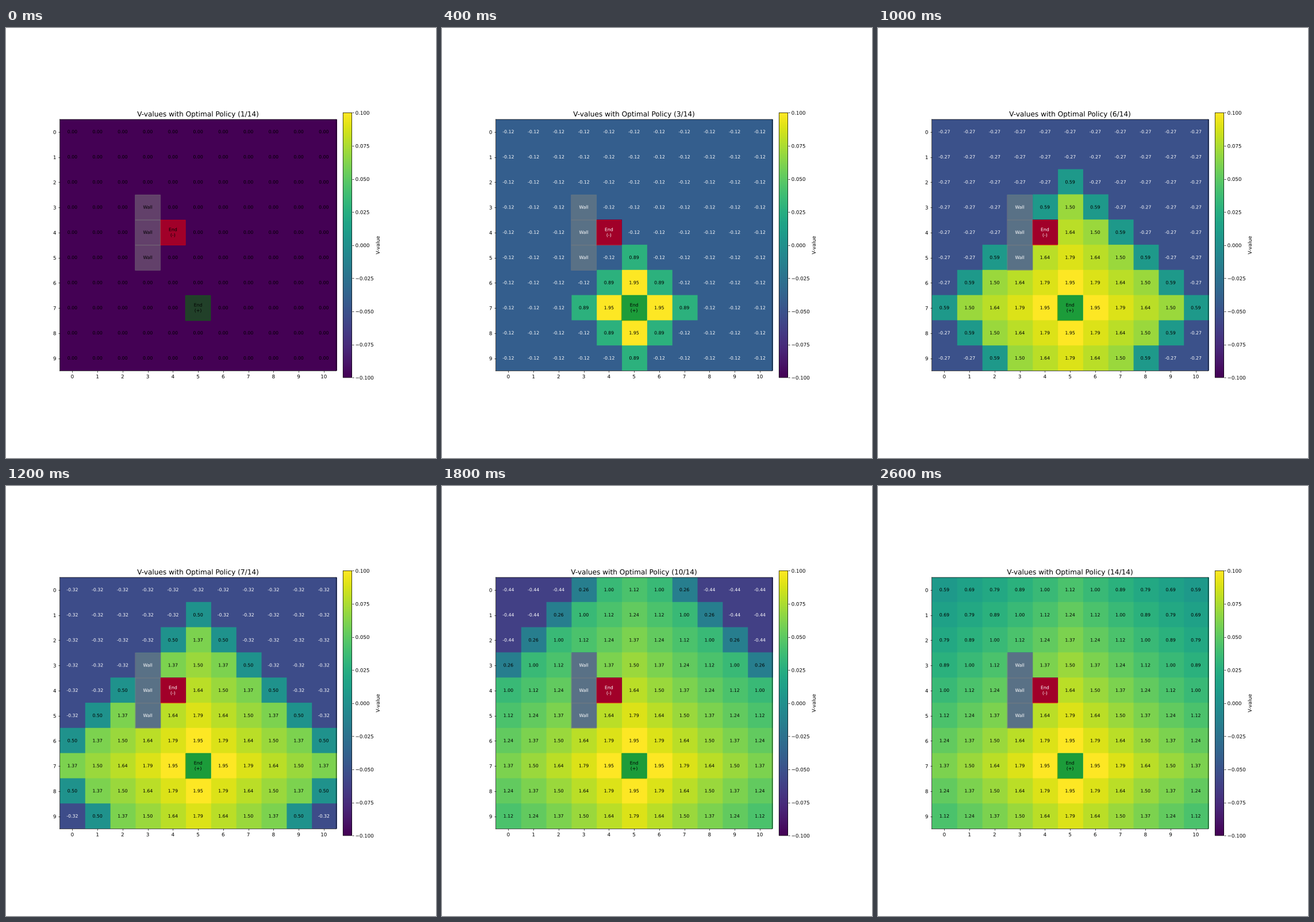
Write a matplotlib script that moves like this. It is 748 by 748 pixels and loops after 2.8 s.

```python
import numpy as np
import matplotlib.pyplot as plt
from matplotlib.animation import FuncAnimation
from matplotlib.cm import ScalarMappable
from matplotlib.colors import Normalize
from matplotlib.patches import Rectangle
from matplotlib.patheffects import Normal
from matplotlib.text import Text

ROWS, COLS, STEPS = 10, 11, 14
WALLS = [(3, 3), (4, 3), (5, 3)]
PIT, GOAL = (4, 4), (7, 5)
GAMMA, STEP_REWARD = 0.95, -0.06
FINE = 70  # samples per cell, so that cell edges come out smooth

reward = np.full((ROWS, COLS), STEP_REWARD)
reward[GOAL], reward[PIT] = 1, -1


def sweep(values):
    """One round of value iteration; moving off the grid stays in place."""
    gain = reward + GAMMA * values
    for wall in WALLS:
        gain[wall] = -np.inf
    gain = np.pad(gain, 1, mode="edge")
    best = np.max([gain[:-2, 1:-1], gain[2:, 1:-1],
                   gain[1:-1, :-2], gain[1:-1, 2:]], axis=0)
    for cell in [*WALLS, PIT, GOAL]:
        best[cell] = reward[cell]
    return best


def enlarge(values):
    return np.kron(values, np.ones((FINE, FINE)))


history = [np.zeros((ROWS, COLS))]
while len(history) < STEPS:
    history.append(sweep(history[-1]))

plt.rcParams["text.hinting"] = "none"
fig, ax = plt.subplots(figsize=(12, 12), dpi=748 / 12)
image = ax.imshow(enlarge(history[0]), cmap="viridis", norm=Normalize(0, 0),
                  extent=(-0.5, COLS - 0.5, ROWS - 0.5, -0.5),
                  interpolation_stage="rgba")
ax.set_xticks(range(COLS))
ax.set_yticks(range(ROWS))
title = ax.set_title("", fontsize=14)

scale = ScalarMappable(Normalize(-0.1, 0.1), "viridis")
bar = fig.colorbar(scale, ax=ax, shrink=0.8, aspect=30, pad=0.02,
                   ticks=np.linspace(-0.1, 0.1, 9), label="V-value")

names = {PIT: "End\n(-)", GOAL: "End\n(+)"}
names.update({wall: "Wall" for wall in WALLS})
tints = {PIT: "red", GOAL: "green"}
for (row, col) in names:
    ax.add_patch(Rectangle((col - 0.5, row - 0.5), 1, 1, alpha=0.5,
                           color=tints.get((row, col), "gray")))

labels = {(row, col): ax.text(col, row, "", ha="center", va="center",
                              fontsize=9, linespacing=1.3)
          for row in range(ROWS) for col in range(COLS)}

# Text and frames are drawn as paths at fractions of a pixel.
for text in fig.findobj(Text):
    text.set_path_effects([Normal()])
for frame in [*ax.spines.values(), bar.outline, *ax.patches]:
    frame.set(snap=False, path_effects=[Normal(offset=(0.36, -0.36))])


def update(k):
    values = history[k]
    image.set_data(enlarge(values))
    image.set_clim(values.min(), values.max())
    title.set_text(f"V-values with Optimal Policy ({k + 1}/{STEPS})")
    for cell, label in labels.items():
        value = values[cell]
        label.set_text(names.get(cell, f"{value:.2f}"))
        label.set_color("white" if value < 0 else "black")
    return [image, title, *labels.values()]


anim = FuncAnimation(fig, update, frames=STEPS, interval=200, repeat=True)
plt.show()
```
